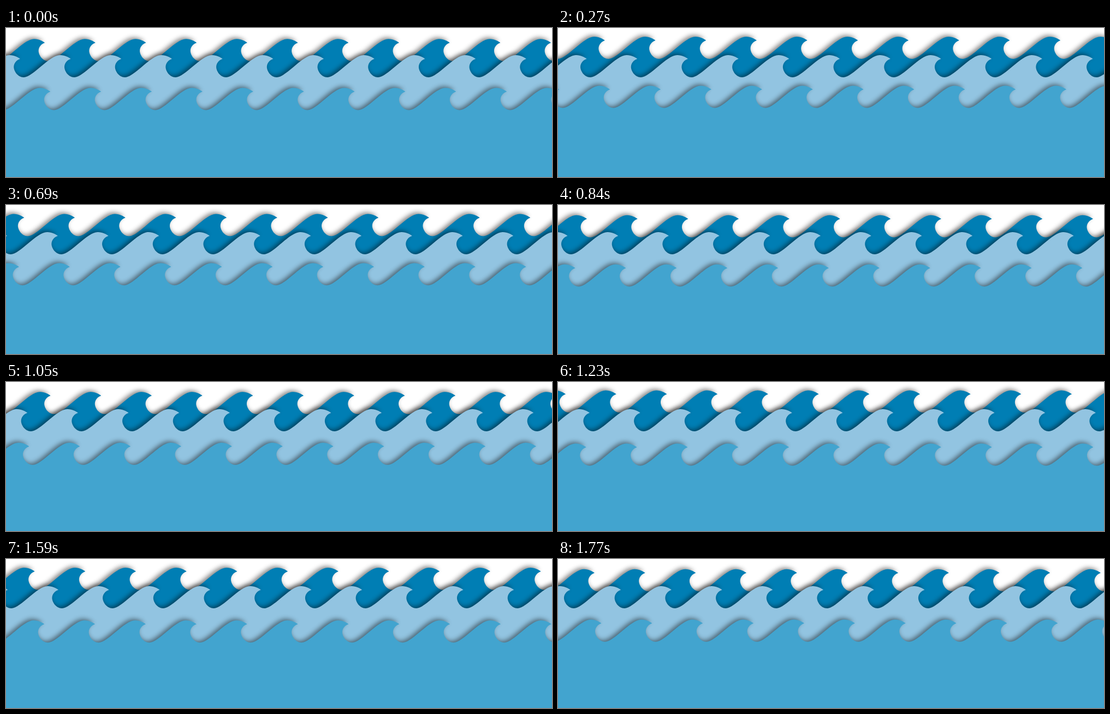
Write an HTML page that moves like this. It is 1000 px wide and 275 px high and loops after 1.8 s.

```html
<!DOCTYPE html>
<html lang="en">
<head>
<meta charset="utf-8">
<title>Waves</title>
<style>
  html, body { margin: 0; width: 100%; height: 100%; overflow: hidden; background: #fff; }
  svg { display: block; width: 100%; height: 100%; }
</style>
</head>
<body>
<svg id="sea" viewBox="0 0 1000 275" preserveAspectRatio="none">
  <defs>
    <filter id="shade" filterUnits="userSpaceOnUse" x="-130" y="-30" width="1260" height="330"
            color-interpolation-filters="sRGB">
      <feDropShadow dx="-3.5" dy="-2.5" stdDeviation="4" flood-color="#000" flood-opacity=".48"/>
    </filter>
  </defs>
</svg>
<script>
const STEP = 30, STEPS = 60, LEG = 15.5;
const sea = document.getElementById('sea');

// Straight runs between evenly spaced points, one run per LEG steps.
function along(points, n) {
  const i = Math.floor(n / LEG), k = n / LEG - i;
  return points[i] + (points[i + 1] - points[i]) * k;
}

const zigzag = n => Math.abs(1 - (n / LEG) % 2);

// x is the left wall of the hollow, y the top of the crest, n the step in the loop.
const layers = [
  { color: '#007eb4', period: 92.7,
    x: n => along([59.6, 85, 146, 211, 248], n),
    y: n => 13 + 7.2 * zigzag(n) },
  { color: '#92c4e1', period: 92.7,
    x: n => 14.3 + 2.95 * n + 0.0023 * n * n,
    y: () => 50 },
  { color: '#42a4cf', period: 92.87,
    x: n => 69.8 + 1.543 * n,
    y: n => along([110.6, 103.7, 111, 114.9, 111], n) }
];

// A row of curling crests, filled down past the bottom of the stage.
function wavePath(period) {
  const left = -3 * period;
  let d = `M${left - 8} 320V0`;
  for (let i = 0; i < 16; i++) {
    const x = left + i * period, p = (dx, y) => `${(x + dx).toFixed(2)} ${y} `;
    d += 'C' + p(1, 0) + p(8, 4) + p(11.5, 7)
       + p(5, 9) + p(0, 15) + p(0, 22)
       + p(0, 29) + p(7, 41) + p(18, 41)
       + p(35, 41) + p(65, 0) + p(period - 8, 0);
  }
  return d + 'V320Z';
}

for (const layer of layers) {
  const path = document.createElementNS('http://www.w3.org/2000/svg', 'path');
  path.setAttribute('d', wavePath(layer.period));
  path.setAttribute('fill', layer.color);
  path.setAttribute('filter', 'url(#shade)');
  layer.path = sea.appendChild(path);
}

function draw(ms) {
  const n = Math.floor(ms / STEP) % STEPS;
  for (const { path, period, x, y } of layers) {
    path.setAttribute('transform', `translate(${(x(n) % period).toFixed(2)} ${y(n).toFixed(2)})`);
  }
}

const start = performance.now();
function tick() {
  draw(performance.now() - start);
  requestAnimationFrame(tick);
}
tick();
</script>
</body>
</html>
```
